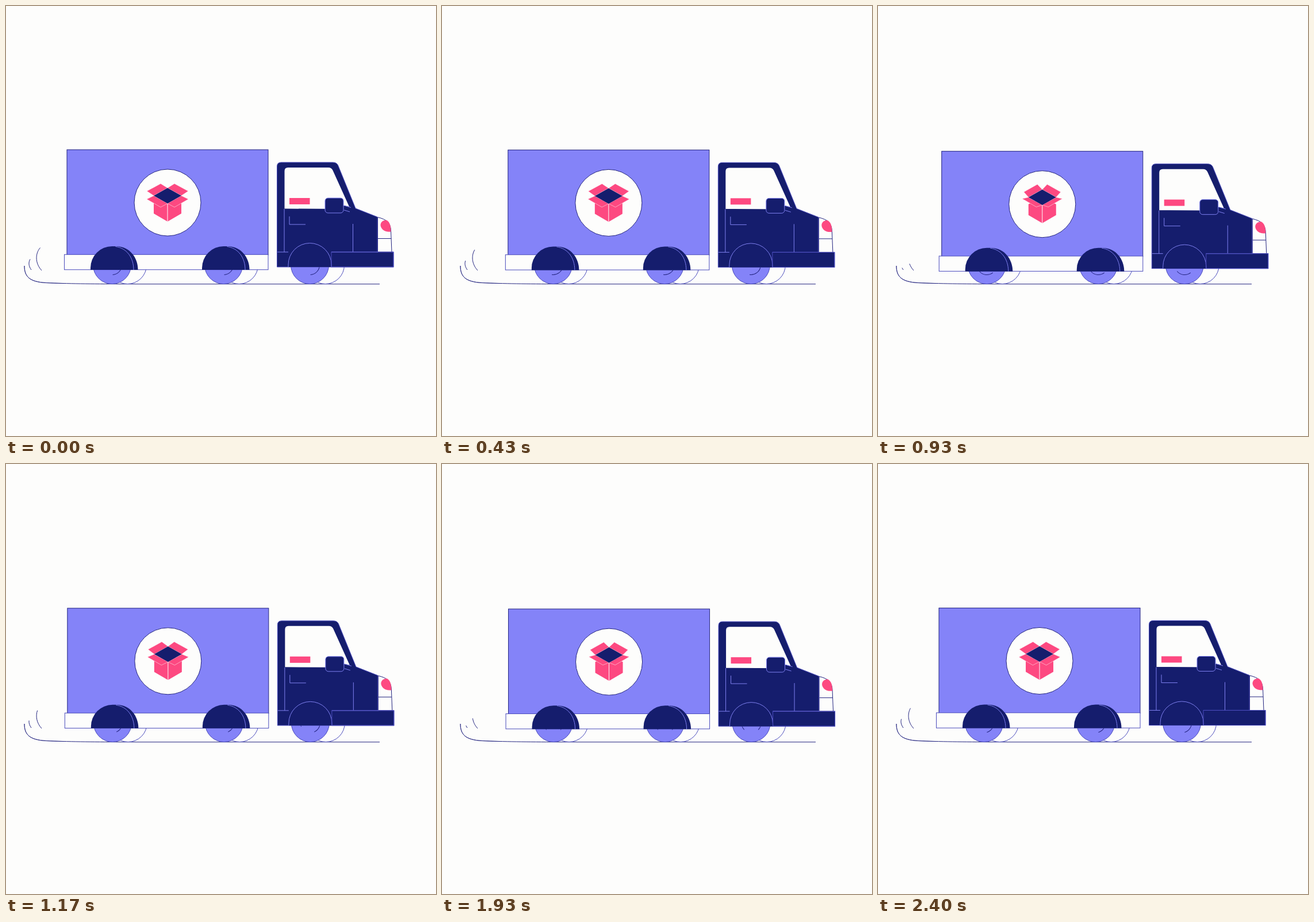
An HTML page that plays this animation: 748 px wide and 748 px high, repeating every 2430 ms.

```html
<!DOCTYPE html>
<html lang="en">
<head>
<meta charset="utf-8">
<title>Delivery truck</title>
<style>
html, body { margin: 0; width: 100%; height: 100%; overflow: hidden; background: #fdfdfc; }
svg { display: block; width: 100vw; height: 100vh; }
.paper { fill: #fdfdfc; }
.navy { fill: #151d6d; }
.lilac { fill: #8483f8; }
.pink { fill: #fd4981; }
.edge { stroke: #22237f; stroke-width: 1; }
.blue { stroke: #4a4bbc; stroke-width: 1; }
.light { stroke: #7f80f0; stroke-width: 1; }
.line { fill: none; }
</style>
</head>
<body>
<svg viewBox="0 0 748 748">
  <rect class="paper" width="748" height="748"/>
  <path class="line edge" d="M32 452C32 470 40 480 70 481.500C105 483 150 483.500 200 483.700H650"/>
  <path class="line edge" d="M32 452C32 470 40 480 70 481.500C80 482 90 482.300 100 482.600" opacity=".6"/>
  <path id="gustA" class="line edge" pathLength="1" d="M59.500 420.500C51 430 50 447 62 460"/>
  <path id="gustB" class="line edge" pathLength="1" d="M42 440.500C39 446 39 452 44 459"/>
  <g id="wheels"></g>
  <g id="body">
    <rect class="lilac edge" x="106" y="250" width="350" height="183"/>
    <rect class="paper blue" x="101.500" y="432.300" width="354.500" height="26.400"/>
    <g id="arches"></g>
    <circle class="paper edge" cx="281" cy="342" r="58"/>
    <path class="pink" d="M257 342V361L281 375L305 361V342L281 330Z"/>
    <path class="line" stroke="#fdfdfc" d="M281 344V375"/>
    <g id="flaps" class="pink"></g>
    <path class="navy" d="M257 330L281 316.500L305 330L281 343.500Z"/>

    <path class="navy blue" d="M471.500 454V279Q471.500 272 478.500 272H568.500Q575 272 577.500 277L608 352L646 367V428H674V454Z"/>
    <path class="paper" d="M484.500 352.500V287Q484.500 281 490.500 281H561Q566 281 568.500 286L597 349L588 347L580 353Z"/>
    <rect class="pink" x="493" y="334" width="35.500" height="11"/>
    <path class="paper edge" d="M646.500 367.500C662 371 669 377 669.500 391L671 428H646.500Z"/>
    <path class="pink" d="M662 372.500C667 375.500 669.500 381 669.500 392.500C658 394 651.500 387 651.500 381C651.500 376 656 372 662 372.500Z"/>
    <path class="line edge" d="M647 404.500H670"/>
    <path class="line light" d="M484 353V428M472 428H491M566 428H647M493 366V380H521M603.500 379V428M588 347L600 350.500M588 355L598 358"/>
    <rect class="navy light" x="555" y="334" width="32" height="26" rx="5"/>
    <path class="navy" d="M491 454V450A37.500 37.500 0 0 1 566 450V454Z"/>
    <path class="line light" d="M491 454V450A37.500 37.500 0 0 1 566 450V454"/>
    <rect class="line blue" x="566" y="428" width="108" height="26"/>
  </g>
</svg>
<script>
const LOOP = 2430, HOP = 405;
const $ = id => document.getElementById(id);
const AXLES = [[184.5, 450.5], [378.5, 450.5], [528.5, 450.5]];
const R = 33, HUB = 17, ARC = 88;

function add(parent, tag, attrs) {
  const el = document.createElementNS('http://www.w3.org/2000/svg', tag);
  for (const k in attrs) el.setAttribute(k, attrs[k]);
  parent.appendChild(el);
  return el;
}

function arc(from, to) {
  const at = a => [HUB * Math.cos(a * Math.PI / 180), HUB * Math.sin(a * Math.PI / 180)].map(v => v.toFixed(2)).join(' ');
  return `M${at(from)}A${HUB} ${HUB} 0 0 1 ${at(to)}`;
}

const wheels = $('wheels'), body = $('body');
for (const [x, y] of AXLES) {
  add(wheels, 'circle', { class: 'paper blue', cx: x + 27, cy: y, r: R });
}
const hubs = AXLES.map(([x, y]) => {
  add(wheels, 'circle', { class: 'lilac blue', cx: x, cy: y, r: R });
  const g = add(wheels, 'g', { transform: `translate(${x} ${y})` });
  return add(g, 'path', { class: 'line edge', d: arc(86 - ARC, 86) + arc(266 - ARC, 266) });
});

for (const [x] of AXLES.slice(0, 2)) {
  const l = x - 37.5;
  add($('arches'), 'path', { class: 'navy', d: `M${l} 459V455.500A37.500 37.500 0 0 1 ${x} 418H${x + 9}C${x + 30} 419 ${x + 45} 437 ${x + 45} 459Z` });
  add($('arches'), 'path', { class: 'line light', d: `M${x + 6} 418.500C${x + 25} 421 ${x + 37.5} 437 ${x + 37.5} 459` });
}

// Each flap is drawn for the left side and mirrored about the badge centre.
const flaps = [1, -1].map(side => {
  const g = add($('flaps'), 'g', { transform: `translate(281 330) scale(${side} 1)` });
  return [0, 1].map(() => add(g, 'path', { stroke: '#fdfdfc', 'stroke-width': .5 }));
});

const wave = t => 5.3 * (1 - Math.cos(4 * Math.PI * (t + 15) / LOOP)) + .8 * Math.sin(Math.PI * t / LOOP) ** 10;

// A bounce from 0 to 1 with a softened landing.
const SOFT = .15;
const bounce = t => (Math.hypot(Math.sin(Math.PI * t / HOP), SOFT) - SOFT) / (Math.hypot(1, SOFT) - SOFT);

function trim(el, start) {
  el.setAttribute('stroke-dasharray', `0 ${start} ${1 - start} 1`);
}

function draw(t) {
  const x = wave(t), hop = bounce(t);
  wheels.setAttribute('transform', `translate(${x} 0)`);
  body.setAttribute('transform', `translate(${x} ${3.45 * hop})`);
  for (const hub of hubs) hub.setAttribute('transform', `rotate(${t / (2 * HOP) * 360})`);
  trim($('gustA'), .88 * hop);
  trim($('gustB'), Math.min(.8, 1.25 * hop));
  for (const [up, low] of flaps) {
    up.setAttribute('d', `M-24 0L${-36 + 5 * hop} ${-8 - 1.5 * hop}L${-12 + 4.5 * hop} ${-21 - 2 * hop}L0 -13.500Z`);
    low.setAttribute('d', `M-24 0L${-36.3 + 1.7 * hop} ${6 - 4.5 * hop}L${-12 + 2 * hop} ${20 - 4 * hop}L0 13.500Z`);
  }
}

const begin = performance.now();
function tick() {
  draw((performance.now() - begin) % LOOP);
  requestAnimationFrame(tick);
}
draw(0);
tick();
</script>
</body>
</html>
```
